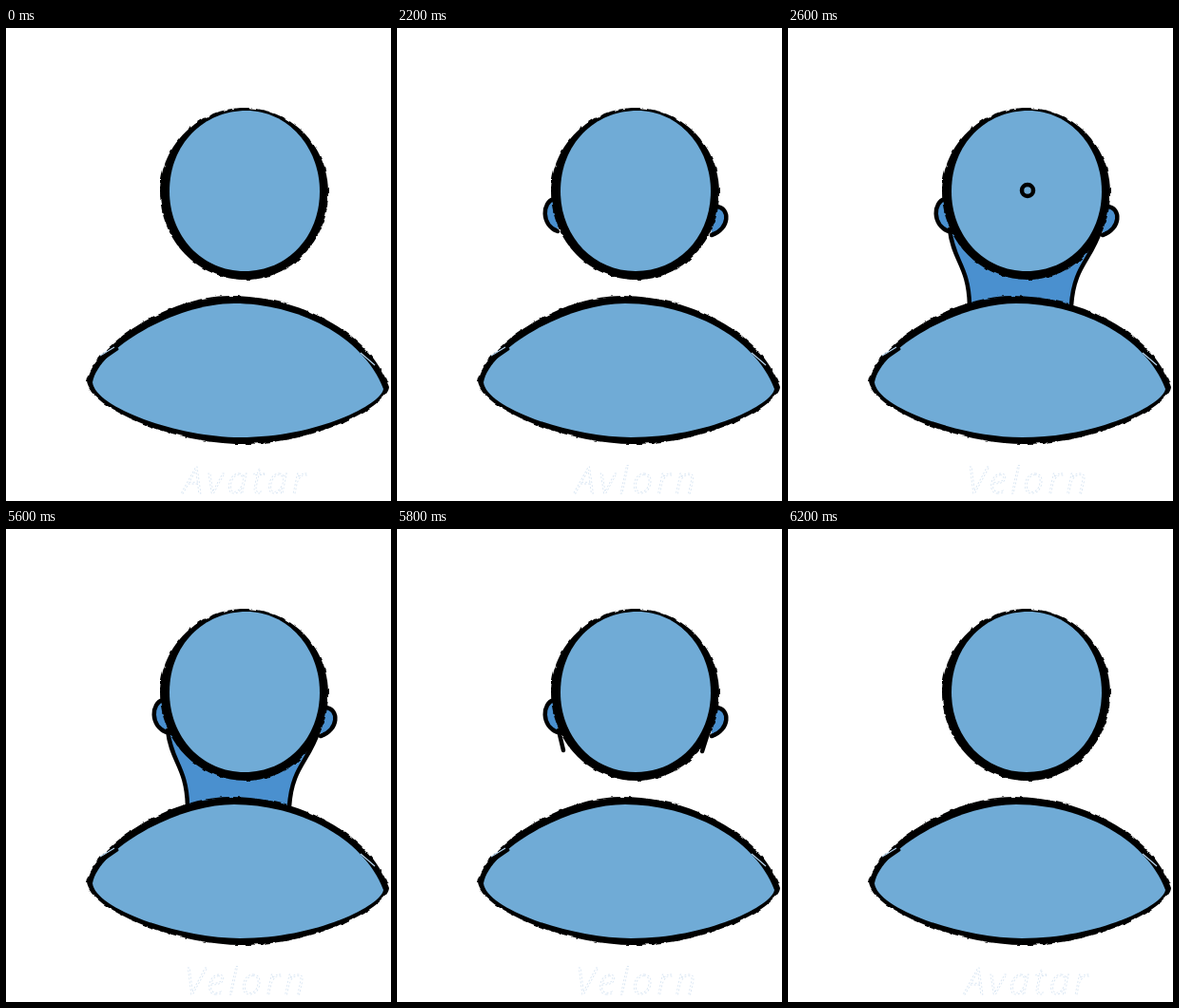
Recreate the animation shown at these times as an HTML page. Size 405 px wide and 498 px high, loop 8200 ms.

```html
<!DOCTYPE html>
<html lang="en">
<head>
<meta charset="utf-8">
<title>Avatar</title>
<style>
  html, body { margin: 0; width: 100%; height: 100%; overflow: hidden; background: #fff; }
  svg { display: block; width: 405px; height: 498px; }
  .line { fill: none; stroke: #000; stroke-width: 4.5; stroke-linecap: round; stroke-linejoin: round; }
  .rough { filter: url(#rough); }
  .skin { fill: #70abd6; }
  .shade { fill: #4a90cf; }
  .gap { fill: none; stroke: #b4d3ec; stroke-width: 1.2; }
  text { font: italic 300 39px "Open Sans", sans-serif; letter-spacing: 4.5px; text-anchor: middle;
         fill: none; stroke: #d9e6f3; stroke-width: 0.9; stroke-dasharray: 2 2; }
</style>
</head>
<body>
<svg viewBox="0 0 405 498">
  <filter id="rough" color-interpolation-filters="sRGB">
    <feTurbulence type="fractalNoise" baseFrequency="0.12" numOctaves="2" seed="4"/>
    <feDisplacementMap in="SourceGraphic" scale="3.5" xChannelSelector="R" yChannelSelector="G"/>
  </filter>

  <g id="earFill" class="shade">
    <path d="M167 181C151 179 151 208 170 215Z"/>
    <path d="M335 189C351 187 349 213 330 218Z"/>
  </g>
  <g class="line">
    <path class="ear" pathLength="1" d="M165 180C153 183 151 207 169 214"/>
    <path class="ear" pathLength="1" d="M336 188C351 189 350 212 331 218"/>
  </g>
  <path id="neckFill" class="shade" d="M170 212C174 246 190 250 191 292H298C301 250 318 246 329 212Z"/>
  <g class="line">
    <path id="neckLeft"/>
    <path id="neckRight"/>
  </g>

  <path class="rough" d="M250 84C298 84 339 122 339 174C339 224 300 265 252 265C202 265 162 224 162 172C162 122 205 84 250 84Z"/>
  <path class="skin" d="M253 87C296 87 330 125 330 172C330 220 296 256 251 256C206 256 172 219 172 172C172 122 208 87 253 87Z"/>
  <circle id="ring" class="line" cx="252" cy="171" r="6"/>

  <path class="rough" d="M85 372C92 335 170 282 236 282C305 282 382 318 403 378C402 396 330 438 248 438C178 438 87 400 85 372Z"/>
  <path class="skin" d="M91 373C97 338 178 290 240 290C305 290 375 323 397 380C395 396 328 431 246 431C182 431 94 400 91 373Z"/>
  <path class="line" style="stroke-width:3" d="M117 338L101 349"/>
  <path class="gap" d="M114 336L99 345M373 342L388 355"/>

  <text id="label" x="253" y="490"></text>
</svg>
<script>
  const LOOP = 8200, STEP = 100, GROW = 2000, SHRINK = 5600, LAST = 7;
  const BEFORE = 'Avatar', AFTER = 'Velorn';
  const el = id => document.getElementById(id);
  const ears = document.querySelectorAll('.ear');
  const show = (id, on) => el(id).style.display = on ? '' : 'none';

  // Neck lines: nothing, short, long, then joined to the shoulders
  const neckLeft = ['', 'M170 212L175 233', 'M170 212Q176 233 189 270', 'M170 212C174 246 190 250 191 292'];
  const neckRight = ['', 'M328 212L321 234', 'M329 212Q319 239 303 268', 'M329 212C318 246 301 250 298 292'];

  function stageAt(t) {
    if (t < GROW) return 0;
    if (t < SHRINK) return Math.min(LAST, 1 + Math.floor((t - GROW) / STEP));
    return Math.max(0, LAST - 1 - Math.floor((t - SHRINK) / STEP));
  }

  function draw(stage) {
    const earPart = [0, 0.25, 0.6, 1][Math.min(stage, 3)];
    for (const ear of ears) {
      ear.style.display = stage ? '' : 'none';
      ear.style.strokeDasharray = earPart + ' 2';
    }
    show('earFill', stage >= 3);

    const neck = Math.min(3, Math.max(0, stage - 3));
    el('neckLeft').setAttribute('d', neckLeft[neck]);
    el('neckRight').setAttribute('d', neckRight[neck]);
    show('neckFill', stage >= 6);
    show('ring', stage >= 7);

    const kept = Math.max(0, BEFORE.length - Math.round(stage * 1.4));
    el('label').textContent = BEFORE.slice(0, kept) + AFTER.slice(kept);
  }

  let shown = -1;
  function frame() {
    const stage = stageAt(performance.now() % LOOP);
    if (stage !== shown) draw(shown = stage);
    requestAnimationFrame(frame);
  }
  frame();
</script>
</body>
</html>
```
